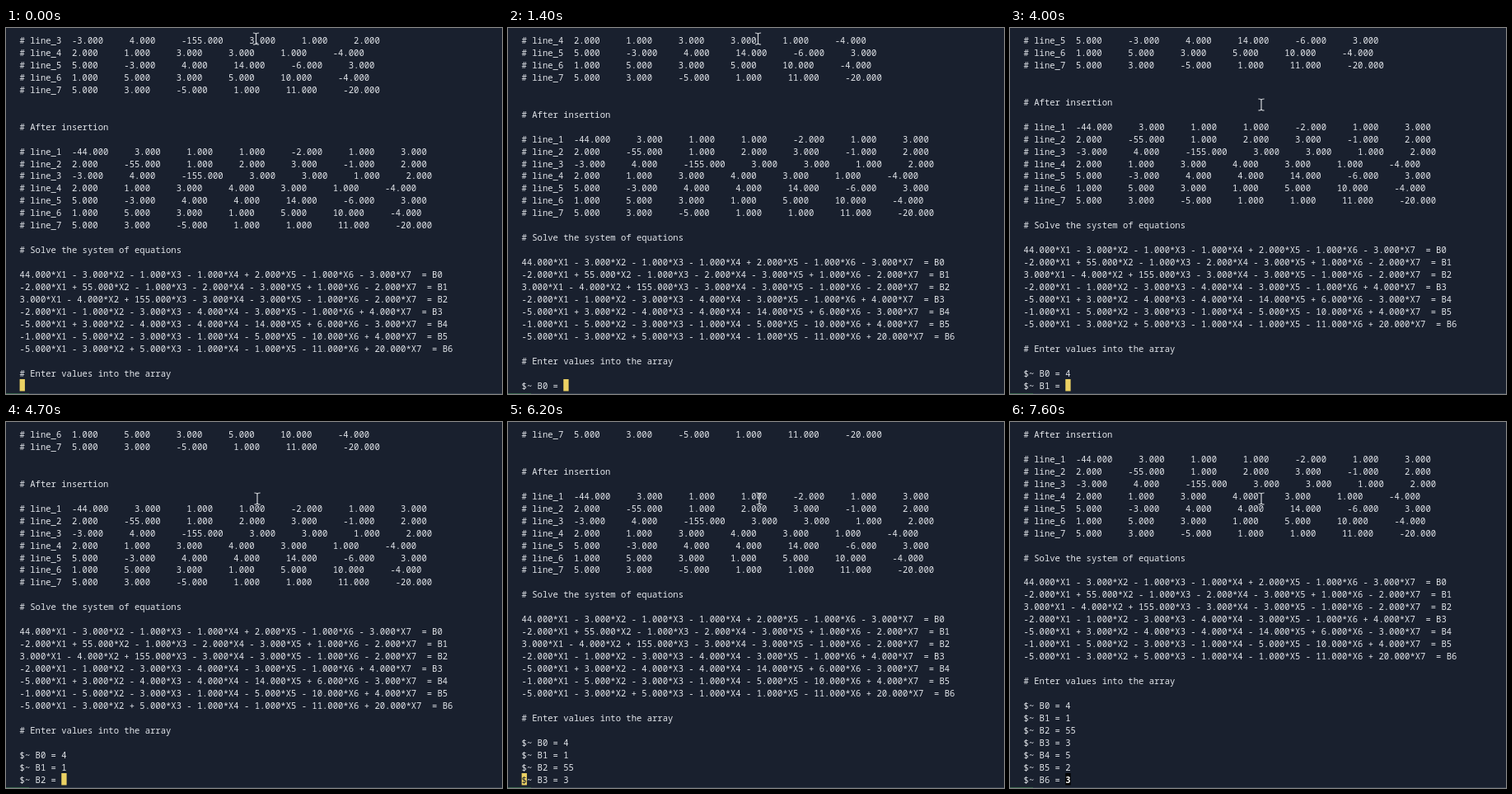
These frames come from a looping animation (602 by 444 pixels, 8 s). An HTML page with a canvas:

```html
<!DOCTYPE html>
<html lang="en">
<head>
<meta charset="utf-8">
<title>Terminal session</title>
<style>
  html, body { margin: 0; width: 100%; height: 100%; overflow: hidden; background: #19202e; }
  canvas { display: block; width: 100vw; height: 100vh; }
</style>
</head>
<body>
<canvas id="stage" width="602" height="444"></canvas>
<script>
const ctx = document.getElementById('stage').getContext('2d');
const LOOP = 8000, ROWS = 29;
const LEFT = 16.6, CHAR = 6.335, BASE = 19, PITCH = 14.95;
const BG = '#19202e', INK = '#e4e7ec', BLOCK = '#ebd163';
const FONT = '10.56px "Noto Sans Mono", "DejaVu Sans Mono", monospace';

const matrix = [
  [-44, 3, 1, 1, -2, 1, 3],
  [2, -55, 1, 2, 3, -1, 2],
  [-3, 4, -155, 3, 3, 1, 2],
  [2, 1, 3, 4, 3, 1, -4],
  [5, -3, 4, 4, 14, -6, 3],
  [1, 5, 3, 1, 5, 10, -4],
  [5, 3, -5, 1, 1, 11, -20]
];

// When each prompt appears, when its keys are pressed, when Enter is pressed
const entries = [
  { at: 200, text: '4', keys: [3000], enter: 3900 },
  { at: 4000, text: '1', keys: [4200], enter: 4400 },
  { at: 4500, text: '55', keys: [5000, 5200], enter: 5700 },
  { at: 5800, text: '3', keys: [6000], enter: 6200 },
  { at: 6300, text: '5', keys: [6800], enter: 6900 },
  { at: 7000, text: '2', keys: [7200], enter: 7300 },
  { at: 7400, text: '3', keys: [7600], enter: Infinity }
];

const rowText = (row, i) =>
  `# line_${i + 1}  ` + row.map(v => v.toFixed(3)).join('     ');

const equation = (row, i) => row.map((v, k) => {
  const term = `${Math.abs(v).toFixed(3)}*X${k + 1}`;
  if (k === 0) return (v > 0 ? '-' : '') + term;
  return (v > 0 ? ' - ' : ' + ') + term;
}).join('') + `  = B${i}`;

const before = matrix.map((row, i) => rowText(row.filter((v, k) => k !== 3), i));
const output = [
  ...before, '', '',
  '# After insertion', '',
  ...matrix.map(rowText), '',
  '# Solve the system of equations', '',
  ...matrix.map(equation), '',
  '# Enter values into the array', ''
];

function session(t) {
  const lines = output.slice();
  let col = 0, typed = false;
  entries.forEach((e, i) => {
    if (t < e.at) return;
    const count = e.keys.filter(k => t >= k).length;
    const line = `$~ B${i} = ` + e.text.slice(0, count);
    lines.push(line);
    const entered = t >= e.enter;
    typed = count > 0 && !entered;
    col = entered ? 0 : line.length - (typed ? 1 : 0);
  });
  return { lines: lines.slice(-ROWS), col, typed };
}

function drawText(text, row, col = 0) {
  const y = Math.round(BASE + row * PITCH);
  for (let i = 0; i < text.length; i++) {
    if (text[i] !== ' ') ctx.fillText(text[i], LEFT + (col + i) * CHAR, y);
  }
}

function drawCursor({ lines, col, typed }) {
  const char = lines[ROWS - 1][col] || '';
  ctx.fillStyle = typed ? '#000' : BLOCK;
  ctx.fillRect(LEFT + col * CHAR, 426, CHAR, 14.5);
  ctx.fillStyle = typed ? '#fff' : BG;
  ctx.font = (typed ? 'bold ' : '500 ') + FONT;
  drawText(char, ROWS - 1, col);
}

function drawPointer(t) {
  const p = Math.min(1, Math.max(0, (t - 1900) / 700));
  const ease = p * p * (3 - 2 * p);
  const x = 303.5 + 1.5 * ease, y = 13 + 80 * ease;
  ctx.strokeStyle = '#d3d6da';
  ctx.lineWidth = 1.2;
  ctx.beginPath();
  for (const s of [-1, 1]) {
    ctx.moveTo(x - 3.6, y + s * 7);
    ctx.quadraticCurveTo(x, y + s * 7, x, y + s * 5.5);
    ctx.quadraticCurveTo(x, y + s * 7, x + 3.6, y + s * 7);
  }
  ctx.moveTo(x, y - 6);
  ctx.lineTo(x, y + 6);
  ctx.stroke();
}

function draw(t) {
  ctx.fillStyle = BG;
  ctx.fillRect(0, 0, 602, 444);
  ctx.fillStyle = '#303a48';
  ctx.fillRect(0, 443, 602, 1);
  ctx.fillStyle = '#37614b';
  ctx.fillRect(0, 443, 28, 1);

  const state = session(t);
  ctx.font = '500 ' + FONT;
  ctx.fillStyle = INK;
  state.lines.forEach((line, row) => drawText(line, row));
  drawCursor(state);
  drawPointer(t);
}

const start = performance.now();
function tick() {
  const t = (performance.now() - start) % LOOP;
  draw(Math.floor(t / 100) * 100);
  requestAnimationFrame(tick);
}
tick();
</script>
</body>
</html>
```
